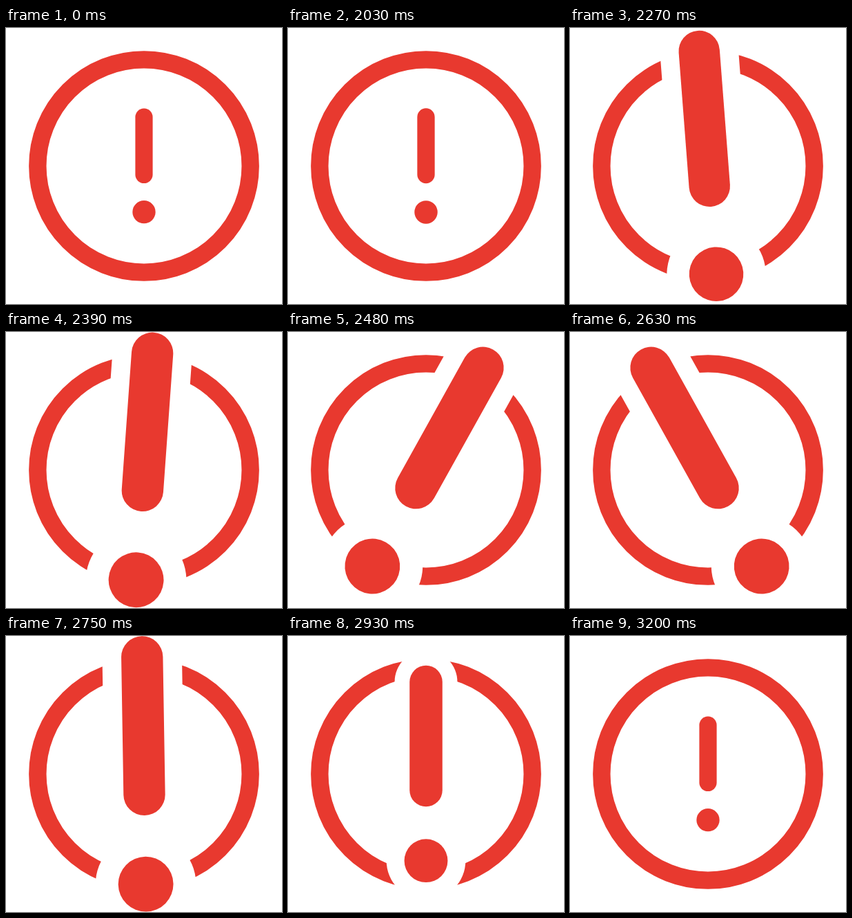
Animation, 400 px wide and 400 px high, one loop 3.23 s. Source, as an HTML page:

```html
<!DOCTYPE html>
<html lang="en">
<head>
<meta charset="utf-8">
<title>Alert icon</title>
<style>
  html, body { margin: 0; width: 100%; height: 100%; overflow: hidden; background: #fff; }
  svg { display: block; width: 100%; height: 100%; }
  line { stroke-linecap: round; }
</style>
</head>
<body>
<svg viewBox="-200 -200 400 400" fill="#e8392f" stroke="#e8392f">
  <circle r="154.17" fill="none" stroke-width="25.4"/>
  <g id="mark" stroke="none">
    <line y1="-70.83" y2="12.5" stroke="#fff" stroke-width="48.2"/>
    <circle cy="66.67" r="30.4" fill="#fff"/>
    <line y1="-70.83" y2="12.5" stroke="#e8392f" stroke-width="25.2"/>
    <circle cy="66.67" r="16.67"/>
  </g>
</svg>
<script>
  const LOOP = 3230, REST = 2000, STEP = 30;
  const mark = document.getElementById("mark");

  // Keys are [step, value]
  const scaleKeys = [[0, 1], [11.1, 2.395], [26, 2.395], [37.1, 1]];
  const angleKeys = [[0, 0], [11, -4.5], [16, 29.1], [21, -29.1], [26, 0]];

  const ease = p => p < 0.5 ? 4 * p ** 3 : 1 - 4 * (1 - p) ** 3;

  function valueAt(keys, step) {
    const next = keys.findIndex(([at]) => at > step);
    if (next < 0) return keys[keys.length - 1][1];
    const [from, a] = keys[next - 1], [to, b] = keys[next];
    return a + (b - a) * ease((step - from) / (to - from));
  }

  const start = performance.now();

  function draw() {
    const time = Math.max(0, performance.now() - start) % LOOP;
    const step = Math.max(0, Math.floor((time - REST) / STEP));
    const angle = valueAt(angleKeys, step), scale = valueAt(scaleKeys, step);
    mark.setAttribute("transform", `rotate(${angle}) scale(${scale})`);
    requestAnimationFrame(draw);
  }
  draw();
</script>
</body>
</html>
```
